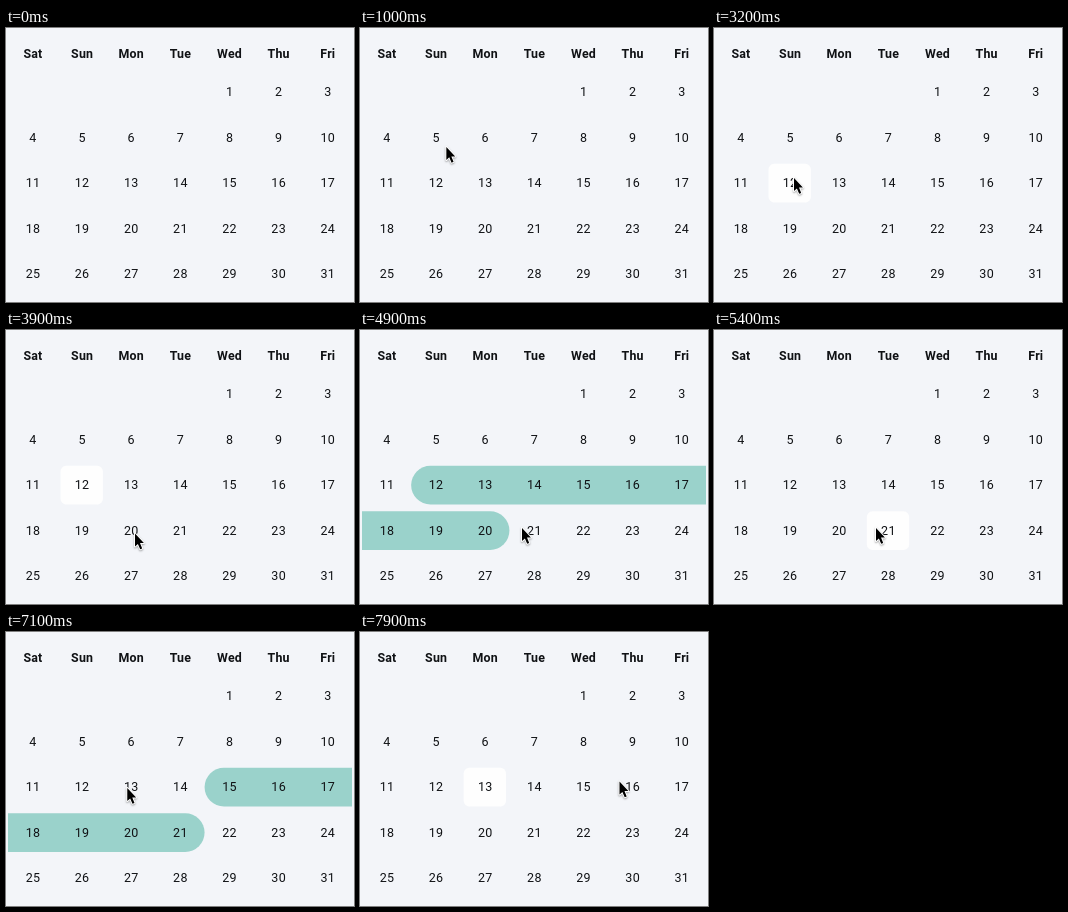
Write an HTML page with a canvas that moves like this. It is 348 px wide and 274 px high and loops after 8 s.

```html
<!DOCTYPE html>
<html lang="en">
<head>
<meta charset="utf-8">
<title>Date range picker</title>
<style>
  html, body { margin: 0; width: 100%; height: 100%; overflow: hidden; background: #f3f5f9; }
  canvas { display: block; width: 348px; height: 274px; }
</style>
</head>
<body>
<canvas id="stage"></canvas>
<script>
const W = 348, H = 274, LOOP = 8000, STEP = 100;
const LEFT = 2, COL = 344 / 7, TOP = 64.1, ROW = 45.5, BAR = 38.6;
const DAYS = ['Sat', 'Sun', 'Mon', 'Tue', 'Wed', 'Thu', 'Fri'];
const OFFSET = 3; // day 1 sits in the fifth column

// Where the pointer goes: it travels from `leave` to `arrive`, then clicks
const ENTRY = { x: 212, y: 247 };
const STOPS = [
  { x: 80, y: 112.5, leave: 300, arrive: 1400, click: 1700 },
  { x: 169, y: 112, leave: 1700, arrive: 2100, click: 2300 },
  { x: 80, y: 150, leave: 2300, arrive: 3100, click: 3200 },
  { x: 129, y: 203.5, leave: 3200, arrive: 3900, click: 4200 },
  { x: 162, y: 198, leave: 4200, arrive: 4900, click: 5200 },
  { x: 216, y: 153.5, leave: 5700, arrive: 6200, click: 6500 },
  { x: 121, y: 156, leave: 6500, arrive: 7200, click: 7500 },
  { x: 259.5, y: 149.5, leave: 7500, arrive: 7900, click: LOOP }
];

const canvas = document.getElementById('stage');
const ctx = canvas.getContext('2d');
const dpr = window.devicePixelRatio || 1;
canvas.width = W * dpr;
canvas.height = H * dpr;

const colX = c => LEFT + COL * c;
const rowY = r => TOP + ROW * r;
const rowOf = i => Math.floor(i / 7);
const cellAt = p => Math.round((p.y - TOP) / ROW) * 7 + Math.floor((p.x - LEFT) / COL);
const easeOut = u => 1 - (1 - u) ** 3;

function box(x, y, w, h, radii, color) {
  ctx.beginPath();
  ctx.roundRect(x, y, w, h, radii);
  ctx.fillStyle = color;
  ctx.fill();
}

function drawRange(a, b) {
  for (let r = rowOf(a); r <= rowOf(b); r++) {
    const from = Math.max(a, r * 7), to = Math.min(b, r * 7 + 6);
    const head = from === a ? BAR / 2 : 0, tail = to === b ? BAR / 2 : 0;
    box(colX(from % 7), rowY(r) - BAR / 2, COL * (to - from + 1), BAR,
      [head, tail, tail, head], '#9ad2cb');
  }
}

// Clicks alternate between picking one day and closing a range
function drawPick(t) {
  const cells = STOPS.filter(s => s.click <= t).map(cellAt);
  const last = cells.at(-1);
  if (cells.length % 2) {
    box(colX(last % 7) + 3.4, rowY(rowOf(last)) - BAR / 2, COL - 6.8, BAR, 5.5, '#fefefe');
  } else if (cells.length) {
    const prev = cells.at(-2);
    drawRange(Math.min(prev, last), Math.max(prev, last));
  }
}

function label(text, col, y) {
  ctx.fillText(text, colX(col + 0.5) + 0.4, y);
}

function drawText() {
  ctx.textAlign = 'center';
  ctx.fillStyle = '#101215';
  ctx.letterSpacing = '0.2px';
  ctx.font = 'bold 12.4px Roboto, sans-serif';
  DAYS.forEach((name, c) => label(name, c, 30.2));
  ctx.letterSpacing = '0.3px';
  ctx.font = '12.5px Roboto, sans-serif';
  for (let d = 1; d <= 31; d++) {
    const i = d + OFFSET;
    label(d, i % 7, rowY(rowOf(i)) + 4.1);
  }
}

function pointerAt(t) {
  const n = STOPS.findLastIndex(s => s.leave <= t);
  if (n < 0) return null;
  const from = STOPS[n - 1] || ENTRY, to = STOPS[n];
  const k = easeOut(Math.min(1, (t - to.leave) / (to.arrive - to.leave)));
  return { x: from.x + (to.x - from.x) * k, y: from.y + (to.y - from.y) * k };
}

const arrow = new Path2D('M0 0V13L2.9 10.4L5.2 15.7L7.2 14.9L5 9.6H8.9Z');

function drawPointer({ x, y }) {
  ctx.save();
  ctx.translate(x, y);
  ctx.lineWidth = 2;
  ctx.lineJoin = 'round';
  ctx.strokeStyle = '#fff';
  ctx.shadowColor = 'rgba(0,0,0,0.35)';
  ctx.shadowBlur = 2 * dpr;
  ctx.shadowOffsetY = dpr;
  ctx.stroke(arrow);
  ctx.shadowColor = 'transparent';
  ctx.fillStyle = '#000';
  ctx.fill(arrow);
  ctx.restore();
}

function draw(t) {
  ctx.setTransform(dpr, 0, 0, dpr, 0, 0);
  ctx.fillStyle = '#f3f5f9';
  ctx.fillRect(0, 0, W, H);
  drawPick(t);
  drawText();
  const pos = pointerAt(t);
  if (pos) drawPointer(pos);
}

const start = performance.now();
function tick() {
  const t = (performance.now() - start) % LOOP;
  draw(Math.floor(t / STEP) * STEP);
  requestAnimationFrame(tick);
}
tick();
</script>
</body>
</html>
```
